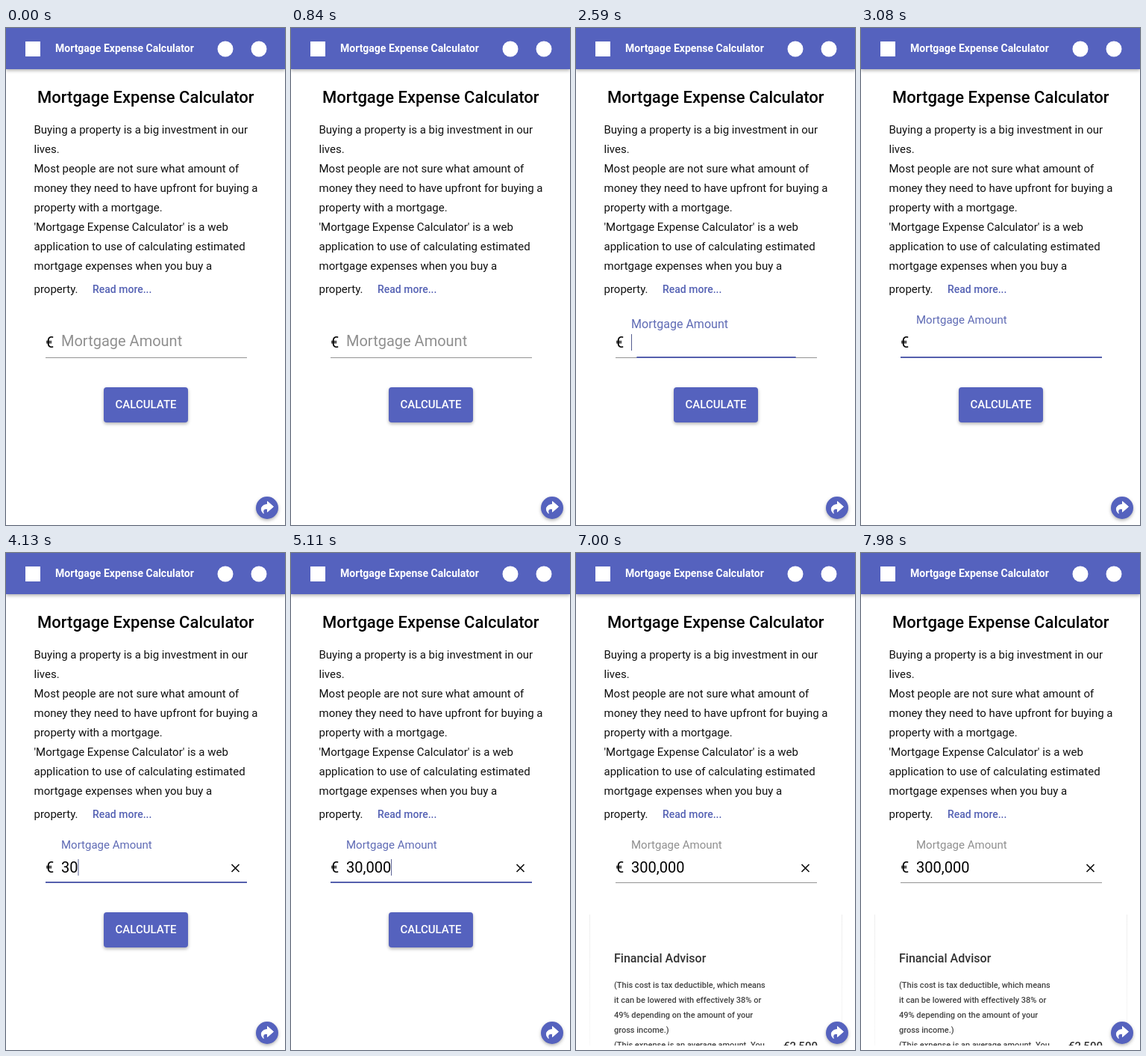
An HTML page for the animation above (8000 ms loop, 374x664 px).

```html
<!DOCTYPE html>
<html lang="en">
<head>
<meta charset="utf-8">
<title>Mortgage Expense Calculator</title>
<style>
  html, body { margin: 0; width: 100%; height: 100%; overflow: hidden; background: #fff; }
  svg { display: block; width: 374px; height: 664px; font-family: Roboto, sans-serif; }
  .medium { font-weight: 500; }
  .body { font-size: 15px; }
  .input { font-size: 20px; }
  .note { font-size: 11px; font-weight: 500; fill: #444; }
  .shadow { filter: drop-shadow(0 2px 2px rgba(0, 0, 0, .3)); }
</style>
</head>
<body>
<svg viewBox="0 0 374 664">
  <defs>
    <clipPath id="buttonClip"><rect x="131" y="480" width="113" height="47" rx="4"/></clipPath>
    <clipPath id="cardClip"><rect y="470" width="374" height="188"/></clipPath>
    <linearGradient id="edge" x2="0" y2="1">
      <stop stop-color="#eee"/><stop offset="1" stop-color="#f8f8f8"/>
    </linearGradient>
  </defs>
  <rect width="374" height="664" fill="#fff"/>

  <rect class="shadow" width="374" height="55" fill="#5562be"/>
  <g fill="#fff">
    <rect x="26" y="18" width="20" height="20"/>
    <text x="66" y="32" font-size="14" font-weight="700">Mortgage Expense Calculator</text>
    <circle cx="294" cy="28" r="10.5"/>
    <circle cx="339" cy="28" r="10.5"/>
  </g>

  <text class="medium" x="42" y="100" font-size="22">Mortgage Expense Calculator</text>
  <g id="intro" class="body" fill="#111"></g>
  <text class="medium" x="116" y="354" font-size="14" fill="#5562b4">Read more...</text>

  <text class="input" x="53" y="427">€</text>
  <text id="label" class="input">Mortgage Amount</text>
  <text id="amount" class="input" x="74" y="427"></text>
  <rect id="caret" y="409" width="1" height="22" fill="#555d90"/>
  <path id="clear" d="M302.5 416l10 10m0-10l-10 10" stroke="#111" stroke-width="1.7"/>
  <rect x="53" y="440" width="270" height="1" fill="#949494"/>
  <rect id="underline" x="53" y="439" width="270" height="2" fill="#5560ad"/>

  <g id="button">
    <rect class="shadow" x="131" y="480" width="113" height="47" rx="4" fill="#5562be"/>
    <circle id="ripple" cx="193" cy="493" fill="#fff" clip-path="url(#buttonClip)"/>
    <text class="medium" x="187.5" y="508" font-size="15" fill="#fff" text-anchor="middle">CALCULATE</text>
  </g>

  <g id="card" clip-path="url(#cardClip)">
    <path d="M18 483h1v175h-1zM356 483h1v175h-1z" fill="url(#edge)"/>
    <text class="medium" x="51" y="547" font-size="16" fill="#333">Financial Advisor</text>
    <g id="notes" class="note"></g>
    <text class="medium" x="278" y="664" font-size="15" fill="#333">€2,500</text>
  </g>

  <circle class="shadow" cx="350" cy="641" r="15" fill="#5562be"/>
  <path d="M350.5 632.5l8 7-8 7v-4.200c-5 0-6.500 1.700-5.300 6.200-5-4.500-3.500-11.800 5.300-12z" fill="#fff" stroke="#fff" stroke-linejoin="round"/>
</svg>
<script>
const LOOP = 8000, FOCUS = 2450, PRESS = 6480, BLUR = 6560, RESULT = 6720;
const BLINK = 530, BLUE = '#5f6bb5', GREY = '#909090';
const TYPING = [
  [FOCUS, ''], [3700, '3'], [4000, '30'], [4270, '300'],
  [4550, '3,000'], [4850, '30,000'], [5430, '300,000']
];
const $ = id => document.getElementById(id);

function addLines(group, x, y, step, lines) {
  lines.forEach((line, i) => {
    const text = document.createElementNS('http://www.w3.org/2000/svg', 'text');
    text.setAttribute('x', x);
    text.setAttribute('y', y + i * step);
    text.textContent = line;
    group.append(text);
  });
}

addLines($('intro'), 37.5, 141, 26, [
  'Buying a property is a big investment in our',
  'lives.',
  'Most people are not sure what amount of',
  'money they need to have upfront for buying a',
  'property with a mortgage.',
  "'Mortgage Expense Calculator' is a web",
  'application to use of calculating estimated',
  'mortgage expenses when you buy a'
]);
addLines($('intro'), 37.5, 354, 0, ['property.']);
addLines($('notes'), 51, 581, 20, [
  '(This cost is tax deductible, which means',
  'it can be lowered with effectively 38% or',
  '49% depending on the amount of your',
  'gross income.)',
  '(This expense is an average amount. You'
]);

const progress = (t, start, length) => Math.min(1, Math.max(0, (t - start) / length));
const smooth = p => p * p * (3 - 2 * p);
const show = (id, visible) => $(id).setAttribute('visibility', visible ? 'visible' : 'hidden');

function render(t) {
  const focused = t >= FOCUS && t < BLUR;
  const lift = smooth(progress(t, FOCUS, 200));
  $('label').setAttribute('transform', `translate(74 ${425 - 30 * lift}) scale(${1 - .25 * lift})`);
  $('label').setAttribute('fill', focused ? BLUE : GREY);

  const spread = lift * (1 - smooth(progress(t, BLUR, 200)));
  $('underline').setAttribute('transform', `translate(${188 * (1 - spread)} 0) scale(${spread} 1)`);

  const [since, value] = TYPING.filter(([start]) => t >= start).pop() || [0, ''];
  $('amount').textContent = value;
  show('clear', value);
  const digits = value.replace(',', '').length;
  const width = digits * 11.23 + (value.includes(',') ? 3.92 : 0);
  $('caret').setAttribute('x', 74 + width);
  show('caret', focused && Math.floor((t - since) / BLINK) % 2 === 0);

  const wave = progress(t, PRESS, 550);
  $('ripple').setAttribute('r', t < PRESS ? 0 : 8 + 72 * smooth(wave));
  $('ripple').setAttribute('opacity', .1 + .2 * wave);
  show('button', t < RESULT);
  $('card').setAttribute('opacity', progress(t, RESULT, 180));
}

const origin = performance.now();
function tick() {
  render((performance.now() - origin) % LOOP);
  requestAnimationFrame(tick);
}
tick();
</script>
</body>
</html>
```
